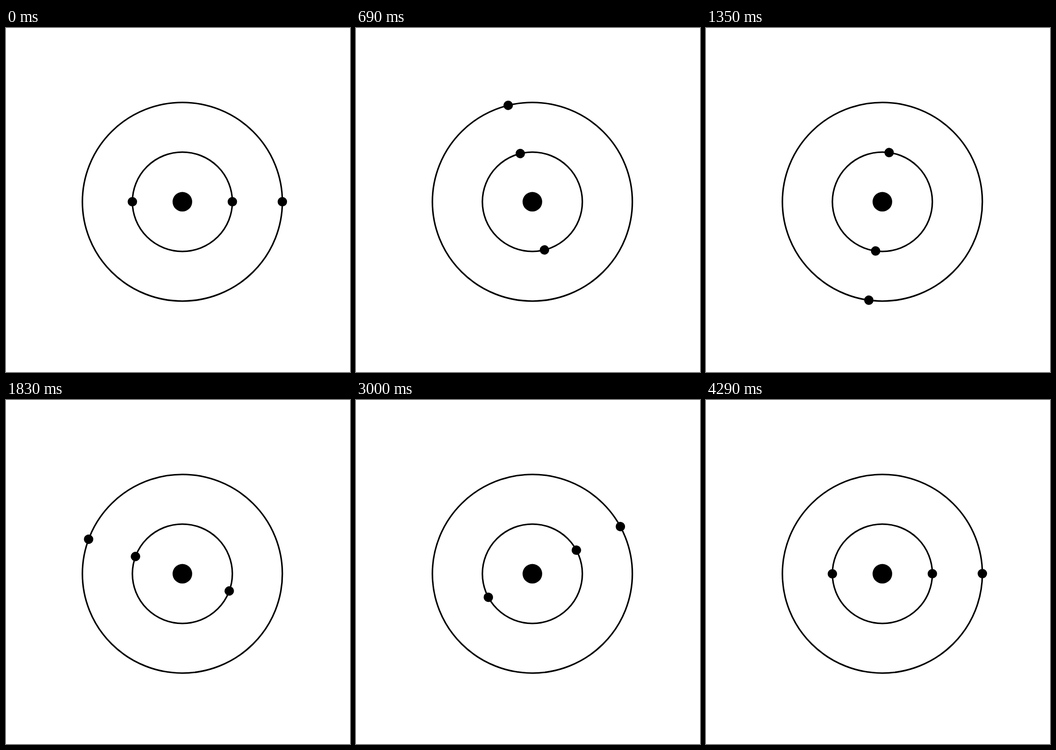
An HTML page that plays this animation: 748x748 px, repeating every 4.52 s.

```html
<!DOCTYPE html>
<html lang="en">
<head>
<meta charset="utf-8">
<title>Atom</title>
<style>
  html, body { margin: 0; width: 100%; height: 100%; overflow: hidden; background: #fff; }
  svg { display: block; width: 100vw; height: 100vh; }
  .orbit { fill: none; stroke: #000; stroke-width: 3.3; }
</style>
</head>
<body>
<svg viewBox="0 0 748 748">
  <g transform="translate(383.5 377.8) scale(1.0065 1)">
    <circle class="orbit" r="216"/>
    <circle class="orbit" r="108"/>
    <circle r="21.2"/>
    <g id="electrons">
      <circle cx="216" r="10.2"/>
      <circle cx="108" r="10.2"/>
      <circle cx="-108" r="10.2"/>
    </g>
  </g>
</svg>
<script>
  const LOOP = 4520, STEP = 30, LAST = 143, END = 150;
  const SPIN = 764.5; // degrees left to turn at full length of the ease
  const electrons = document.getElementById('electrons');
  const start = performance.now();

  // Rest pose, a sudden jump, then a cubic ease-out back to rest.
  function angleAt(time) {
    const step = Math.min(LAST, Math.floor(time / STEP + 1e-6));
    if (step === 0) return 0;
    const left = step === 1 ? END + 1 : END - step;
    return SPIN * (left / END) ** 3;
  }

  function draw() {
    const time = Math.max(0, performance.now() - start) % LOOP;
    electrons.setAttribute('transform', `rotate(${-angleAt(time)})`);
    requestAnimationFrame(draw);
  }
  draw();
</script>
</body>
</html>
```
